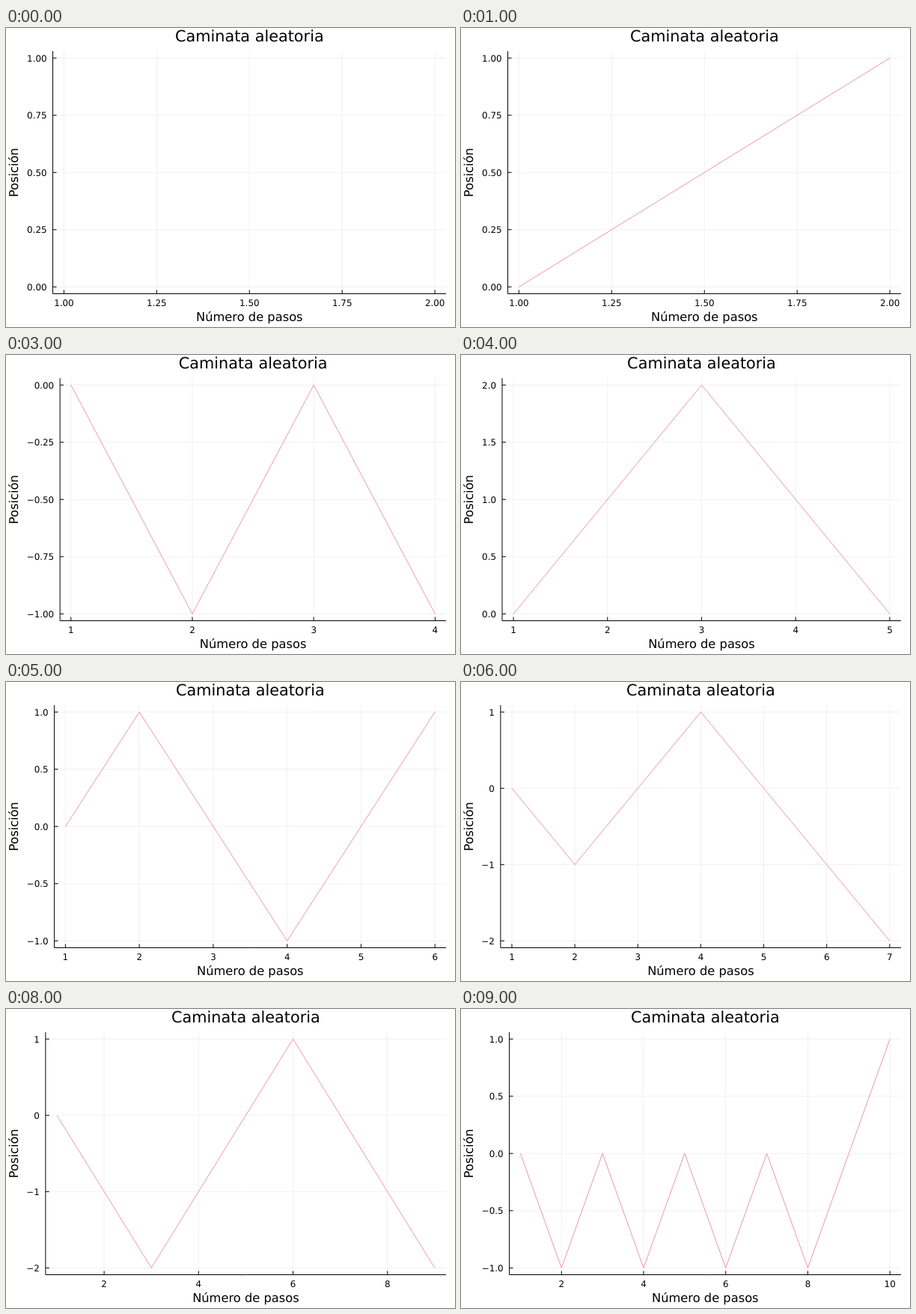
Write an HTML page with a canvas that moves like this. It is 600 px wide and 400 px high and loops after 10 s.

```html
<!DOCTYPE html>
<html lang="es">
<head>
<meta charset="utf-8">
<title>Caminata aleatoria</title>
<style>
  html, body { margin: 0; width: 100%; height: 100%; overflow: hidden; background: #fff; }
  canvas { display: block; }
</style>
</head>
<body>
<canvas id="stage" width="600" height="400"></canvas>
<script>
const ctx = document.getElementById('stage').getContext('2d');
ctx.textRendering = 'geometricPrecision';

// One walk per second, written as its up (+) and down (-) steps.
const WALKS = ['', '+', '+-', '-+-', '++--', '+--++', '-++---',
               '--+--+-', '--+++---', '-+-+-+-++'];
const TOP = 31, BOTTOM = 355.5, RIGHT = 588;
const TICK_SIZE = 11.9, GUIDE_SIZE = 16.3, TITLE_SIZE = 20.8;

const setFont = size => { ctx.font = `${size}px "DejaVu Sans", sans-serif`; };

function text(label, x, y, size, align = 'center') {
  setFont(size);
  ctx.textAlign = align;
  ctx.fillStyle = '#000';
  ctx.fillText(label, x, y);
}

function line(points, color) {
  ctx.beginPath();
  points.forEach(([x, y]) => ctx.lineTo(x, y));
  ctx.strokeStyle = color;
  ctx.stroke();
}

function ticks(min, max) {
  const span = max - min;
  const step = span < 2 ? 0.25 : span < 3 ? 0.5 : span < 7 ? 1 : 2;
  const decimals = step === 0.25 ? 2 : step === 0.5 ? 1 : 0;
  const list = [];
  for (let v = Math.ceil(min / step) * step; v <= max; v += step)
    list.push({ value: v, label: v.toFixed(decimals).replace('-', '\u2212') });
  return list;
}

// Linear scale with a 3 % margin of the data range at both ends.
function scale(min, max, from, to) {
  const unit = (to - from) / (1.06 * (max - min));
  return v => from + (v - min + 0.03 * (max - min)) * unit;
}

// Measured at a large size, because glyph bounds are rounded to whole pixels.
function inkWidth(label) {
  const zoom = 50;
  setFont(TICK_SIZE * zoom);
  const m = ctx.measureText(label);
  return (m.actualBoundingBoxLeft + m.actualBoundingBoxRight) / zoom;
}

function draw(steps) {
  const walk = [0];
  for (const s of steps) walk.push(walk[walk.length - 1] + (s === '+' ? 1 : -1));
  const xMax = Math.max(2, walk.length);
  const yMin = Math.min(...walk);
  const yMax = Math.max(...walk, yMin + 1);
  const xTicks = ticks(1, xMax), yTicks = ticks(yMin, yMax);

  // The widest label sets the left edge of the plot.
  const left = 37.5 + Math.max(...yTicks.map(t => inkWidth(t.label)));
  const middle = (left + RIGHT) / 2;
  const px = scale(1, xMax, left, RIGHT);
  const py = scale(yMin, yMax, BOTTOM, TOP);

  ctx.fillStyle = '#fff';
  ctx.fillRect(0, 0, 600, 400);

  const grid = 'rgba(0,0,0,0.06)';
  for (const t of xTicks) line([[px(t.value), TOP], [px(t.value), BOTTOM]], grid);
  for (const t of yTicks) line([[left, py(t.value)], [RIGHT, py(t.value)]], grid);

  line([[left, TOP], [left, BOTTOM], [RIGHT, BOTTOM]], '#000');
  for (const t of xTicks) {
    const x = px(t.value);
    line([[x, BOTTOM], [x, BOTTOM - 5]], '#000');
    text(t.label, x, 371.5, TICK_SIZE);
  }
  for (const t of yTicks) {
    const y = py(t.value);
    line([[left, y], [left + 5, y]], '#000');
    text(t.label, left - 8, y + 4.35, TICK_SIZE, 'right');
  }

  if (walk.length > 1) line(walk.map((v, i) => [px(i + 1), py(v)]), '#ee97a5');

  text('Caminata aleatoria', middle, 18.4, TITLE_SIZE);
  text('Número de pasos', middle, 392.3, GUIDE_SIZE);
  ctx.save();
  ctx.translate(16.4, 193.3);
  ctx.rotate(-Math.PI / 2);
  text('Posición', 0, 0, GUIDE_SIZE);
  ctx.restore();
}

const start = performance.now();
function frame() {
  const elapsed = performance.now() - start;
  draw(WALKS[Math.floor(elapsed / 1000) % WALKS.length]);
  requestAnimationFrame(frame);
}
frame();
</script>
</body>
</html>
```
